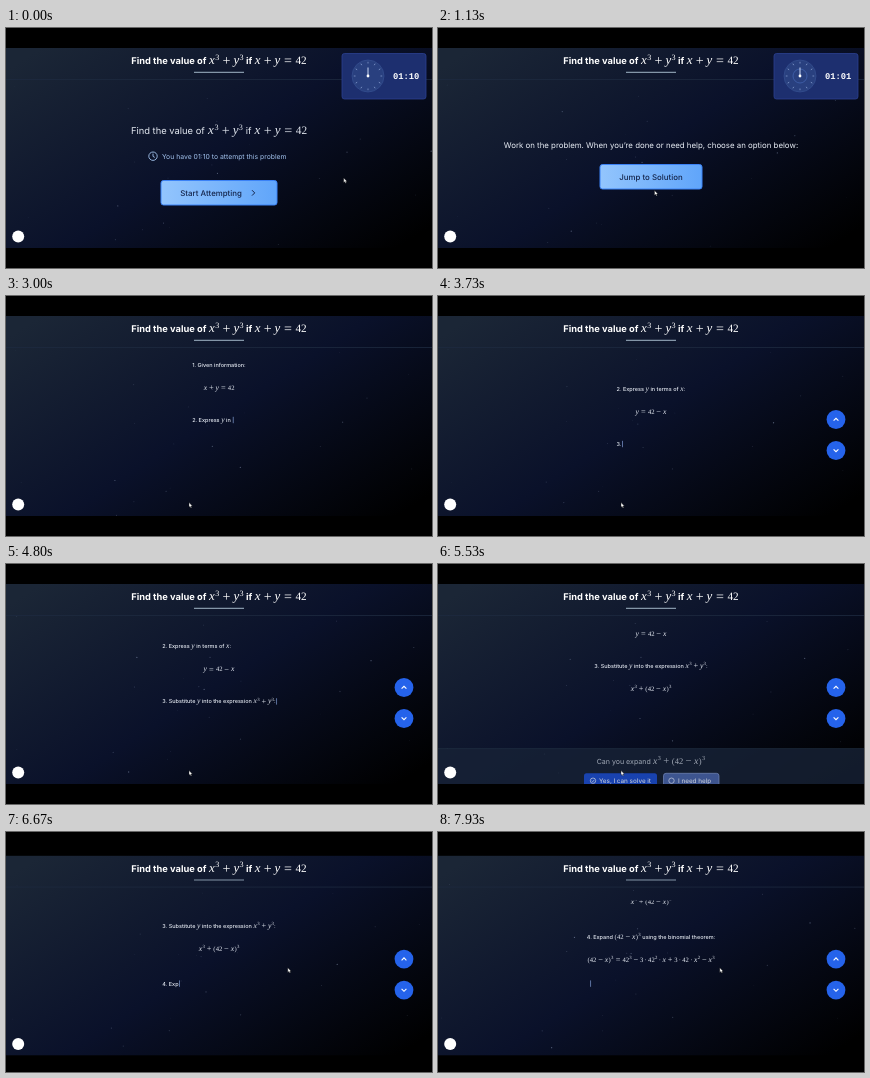
Recreate the animation shown at these times as an HTML page. Size 426x240 px, loop 8000 ms.

```html
<!DOCTYPE html>
<html lang="en">
<head>
<meta charset="utf-8">
<title>Solve for x and y</title>
<style>
  html, body { margin: 0; width: 100%; height: 100%; overflow: hidden; background: #000; }
  svg { display: block; width: 100vw; height: 100vh; }
  text { white-space: pre; text-rendering: geometricPrecision; font-family: Inter, sans-serif; }
  .m { font-family: "Liberation Serif", serif; text-anchor: middle; }
  .i { font-style: italic; }
  .mono { font: bold 8.8px "Liberation Mono", monospace; }
</style>
</head>
<body>
<svg viewBox="0 0 426 240">
  <defs>
    <linearGradient id="bg" gradientUnits="userSpaceOnUse" x1="115" y1="-32" x2="311" y2="272">
      <stop offset="0" stop-color="#1b2636"/><stop offset=".5" stop-color="#0a112a"/><stop offset="1" stop-color="#000"/>
    </linearGradient>
    <linearGradient id="btn"><stop offset="0" stop-color="#93c5fd"/><stop offset="1" stop-color="#60a5fa"/></linearGradient>
    <clipPath id="frame"><rect y="20" width="426" height="200"/></clipPath>
    <clipPath id="body"><rect y="65" width="426" height="155"/></clipPath>
  </defs>
  <rect width="426" height="240"/>
  <g id="scene">
    <g clip-path="url(#frame)">
      <rect y="20" width="426" height="200" fill="url(#bg)"/>
      <g id="stars" fill="#b6c6e6"></g>
      <path d="M0 51.5H426" stroke="#1e2a3f" stroke-width=".8"/>
      <g id="title" fill="#fff"></g>
      <path d="M188 44.4H238" stroke="#8496a8" stroke-width="1.1"/>

      <g id="timer">
        <rect x="336" y="25.5" width="84" height="45.5" rx="2.5" fill="#1d2f6f" stroke="#2b4191" stroke-width=".8"/>
        <circle cx="362" cy="48" r="16" fill="#29407f" stroke="#3a5596" stroke-width=".6"/>
        <g id="ticks" stroke="#8ea5d6" stroke-width=".7"></g>
        <circle id="ring" cx="362" cy="48" r="7" fill="none" stroke="#4667b5" stroke-width=".7"/>
        <path d="M362 48V39.5" stroke="#dbe7ff" stroke-width=".9"/>
        <circle cx="362" cy="48" r="1.4" fill="#fff"/>
        <text id="count" class="mono" x="387" y="51.3" fill="#fff"></text>
      </g>

      <g id="intro">
        <g id="question" fill="#e3e8f0"></g>
        <g fill="none" stroke="#a3c3ee" stroke-width=".9"><circle cx="147" cy="128.2" r="4.2"/><path d="M147 125.6V128.4L148.8 129.4"/></g>
        <g id="limit" fill="#a3c3ee"></g>
        <rect x="155" y="152.5" width="116" height="24.5" rx="2.5" fill="url(#btn)" stroke="#3b82f6"/>
        <g id="start" fill="#14244a"></g>
        <path d="M246 162.2L248.7 164.9L246 167.6" fill="none" stroke="#14244a"/>
      </g>

      <g id="work">
        <g id="hint" fill="#e8edf5"></g>
        <rect x="162" y="136.5" width="102" height="24.5" rx="2.5" fill="url(#btn)" stroke="#3b82f6"/>
        <g id="jump" fill="#14244a"></g>
      </g>

      <g clip-path="url(#body)"><g id="steps" fill="#e6ebf3"></g></g>

      <g id="nav" fill="none" stroke="#fff" stroke-width="1.1">
        <g fill="#2563eb" stroke="none"><circle cx="398" cy="123.5" r="9.4"/><circle cx="398" cy="154.5" r="9.4"/></g>
        <path d="M395.6 124.7L398 122.3L400.4 124.7M395.6 153.3L398 155.7L400.4 153.3"/>
      </g>

      <g id="panel">
        <rect width="426" height="60" fill="#172236"/>
        <path d="M0 .3H426" stroke="#263449" stroke-width=".6"/>
        <g id="ask" fill="#c3ccd8"></g>
        <rect x="146" y="25" width="73" height="15" rx="2.5" fill="#1d4fd0"/>
        <rect x="225.500" y="25" width="55.500" height="15" rx="2.5" fill="#4a66ab" stroke="#8ba4dc" stroke-width=".7"/>
        <g fill="none" stroke="#dbe6ff" stroke-width=".8"><circle cx="155" cy="32.400" r="2.700"/><path d="M153.800 32.400L154.800 33.400L156.300 31.500"/><circle cx="233.500" cy="32.400" r="2.700"/></g>
        <g id="answers" fill="#e4ecff"></g>
      </g>
      <circle cx="12.200" cy="208.400" r="6" fill="#fff"/>
    </g>
  </g>
  <path id="cursor" d="M0 0V4.600L1.100 3.700L1.900 5.300L2.700 4.900L2 3.400H3.400Z" fill="#fff" stroke="#111" stroke-width=".4"/>
</svg>
<script>
const $ = id => document.getElementById(id);
const LOOP = 8000, MID = 213, CUT = 5930, CHAR = 25;
const clamp = v => Math.max(0, Math.min(1, v));
const ramp = (t, a, b) => clamp((t - a) / (b - a));
const smooth = p => p * p * (3 - 2 * p);
const easeOut = p => 1 - (1 - p) ** 3;
const fade = (id, v) => {
  $(id).setAttribute('opacity', v);
  $(id).style.display = v > 0 ? '' : 'none';
};
const move = (id, x, y) => $(id).setAttribute('transform', `translate(${x} ${y})`);

// Text layout: plain runs in Inter, $...$ runs as small formulas.
const pen = document.createElement('canvas').getContext('2d');
function measure(s, size, weight) {
  pen.font = `${weight} 100px Inter, sans-serif`;
  return pen.measureText(s).width * size / 100;
}

const glyphWidth = { x: .572, y: .526, '(': .389, ')': .389, '+': .778, '−': .778, '=': .778, '·': .278 };
const gaps = { '+': .222, '−': .222, '·': .222, '=': .278 };

function formula(src, x, y, em) {
  let html = '', w = 0;
  for (let k = 0; k < src.length; k++) {
    const sup = src[k] === '^';
    const c = sup ? src[++k] : src[k];
    const cell = sup ? .4 : glyphWidth[c] || .5;
    const gap = gaps[c] || 0;
    const sign = '+−='.includes(c), letter = 'xy'.includes(c);
    const size = em * (sup ? .72 : sign ? 1.25 : letter ? 1.15 : 1);
    const dy = sup ? -.4 : sign ? .06 : 0;
    w += gap;
    html += `<text class="m${letter ? ' i' : ''}" x="${x + (w + cell / 2) * em}" y="${y + dy * em}" font-size="${size}">${c}</text>`;
    w += cell + gap;
  }
  return { html, w: w * em };
}

function layout(src, x, y, size, weight = 400, count = Infinity) {
  let html = '', w = 0;
  src.split('$').forEach((run, k) => {
    if (count <= 0 || !run) return;
    if (k % 2) {
      if (count >= run.length) {
        const f = formula(run, x + w, y, size * 1.21);
        html += f.html;
        w += f.w;
      }
    } else {
      const s = run.slice(0, count);
      html += `<text x="${x + w}" y="${y}" font-size="${size}" font-weight="${weight}">${s}</text>`;
      w += measure(s, size, weight);
    }
    count -= run.length;
  });
  return { html, w };
}

function centered(src, y, size, weight, mid = MID) {
  const { w } = layout(src, 0, y, size, weight);
  return layout(src, mid - w / 2, y, size, weight).html;
}

const problem = 'Find the value of $x^3+y^3$ if $x+y=42$';
function setText() {
  $('title').innerHTML = centered(problem, 36.3, 9.3, 700);
  $('question').innerHTML = centered(problem, 106.2, 9.4, 400);
  $('limit').innerHTML = layout('You have 01:10 to attempt this problem', 156, 130.7, 6.85).html;
  $('start').innerHTML = layout('Start Attempting', 174.3, 167.6, 7.86, 500).html;
  $('hint').innerHTML = centered('Work on the problem. When you’re done or need help, choose an option below:', 120.4, 7.86, 400);
  $('jump').innerHTML = centered('Jump to Solution', 151.5, 7.86, 500);
  $('ask').innerHTML = centered('Can you expand $x^3+(42−x)^3$', 15.3, 7.05, 400);
  $('answers').innerHTML = layout('Yes, I can solve it', 161, 34.7, 6.3, 500).html + layout('I need help', 240, 34.7, 6.3, 500).html;
}

// y is the line centre before scrolling, at is when typing begins.
const lines = [
  { y: 69, at: 1675, src: '1. Given information:' },
  { y: 92, at: 2330, src: '$x+y=42$', mid: true },
  { y: 124, at: 2600, src: '2. Express $y$ in terms of $x$:' },
  { y: 147, at: 3320, src: '$y=42−x$', mid: true },
  { y: 179, at: 3675, src: '3. Substitute $y$ into the expression $x^3+y^3$:' },
  { y: 202, at: 4880, src: '$x^3+(42−x)^3$', mid: true },
  { y: 225, at: 5050, src: '' },
  { y: 237, at: 6515, src: '4. Expand $(42−x)^3$ using the binomial theorem:' },
  { y: 260, at: 7690, src: '$(42−x)^3=42^3−3·42^2·x+3·42·x^2−x^3$', mid: true },
  { y: 283.5, at: 7860, src: '', indent: 3 }
];
const scrollFor = l => Math.max(0, l.y - 148);

function drawSteps(t) {
  const seen = lines.filter(l => t >= l.at);
  const typed = l => l.mid ? Infinity : Math.floor((t - l.at) / CHAR + .01);
  const widths = seen.map(l => layout(l.src, 0, 0, 5.5, 500, typed(l)).w);
  const left = MID - Math.max(0, ...widths) / 2;
  let html = '';
  seen.forEach((l, k) => {
    const x = l.mid ? MID - widths[k] / 2 : left + (l.indent || 0);
    html += layout(l.src, x, l.y + 2, 5.5, 500, typed(l)).html;
    const waiting = t > 5200 && t < 6515;
    if (k === seen.length - 1 && !waiting)
      html += `<rect x="${x + widths[k] + .6}" y="${l.y - 3.2}" width=".7" height="6.4" fill="#7f9bd2"/>`;
  });
  $('steps').innerHTML = html;
  const scroll = lines.reduce((s, l, k) =>
    k ? s + (scrollFor(l) - scrollFor(lines[k - 1])) * smooth(ramp(t, l.at - 150, l.at)) : s, 0);
  move('steps', 0, -scroll);
}

// Cursor stops: time, x, y.
const stops = [[0, 337.7, 150], [130, 337.7, 150], [420, 216.5, 162.6], [1180, 216.5, 162.6], [1330, 213, 150],
  [1480, 213, 150], [1740, 183, 206.6], [6240, 183, 206.6], [6520, 281.8, 135.8], [LOOP, 281.8, 135.8]];
function moveCursor(t) {
  const k = stops.findIndex(s => s[0] > t);
  const [a, b] = [stops[k - 1], stops[k]];
  const p = smooth(ramp(t, a[0], b[0]));
  move('cursor', a[1] + (b[1] - a[1]) * p, a[2] + (b[2] - a[2]) * p);
}

let seed = 11;
const rand = () => (seed = seed * 16807 % 2147483647) / 2147483647;
const stars = Array.from({ length: 26 }, () => {
  const el = document.createElementNS('http://www.w3.org/2000/svg', 'circle');
  el.setAttribute('r', .3 + rand() * .35);
  $('stars').append(el);
  return { el, x: rand() * 426, y: rand() * 165, vx: (rand() - .5) * 6, vy: (rand() - .5) * 6, ph: rand() * 6 };
});
$('ticks').innerHTML = Array.from({ length: 12 }, (_, k) =>
  `<path d="M362 33.800V35.500" transform="rotate(${k * 30} 362 48)"/>`).join('');

function draw(t) {
  const s = t / 1000;
  stars.forEach(p => {
    p.el.setAttribute('cx', p.x + p.vx * s);
    p.el.setAttribute('cy', 53 + p.y + p.vy * s);
    p.el.setAttribute('opacity', .27 + .15 * Math.sin(s * 2 + p.ph));
  });
  move('scene', 0, t < CUT ? 0 : 3.6);

  const left = 70 - Math.max(0, Math.floor((t - 480) / 70));
  $('count').textContent = `0${Math.floor(left / 60)}:${String(left % 60).padStart(2, '0')}`;
  fade('ring', ramp(t, 480, 560));
  fade('timer', 1 - ramp(t, 1400, 1490));
  fade('intro', 1 - ramp(t, 460, 550));
  fade('work', ramp(t, 550, 660) * (1 - ramp(t, 1400, 1490)));
  fade('nav', ramp(t, 3480, 3600));

  const open = easeOut(ramp(t, 5422, 5672)) * (1 - smooth(ramp(t, 6200, 6400)));
  fade('panel', open);
  move('panel', 0, 220 - 43.5 * open);
  drawSteps(t);
  moveCursor(t);
}

setText();
const began = performance.now();
(function tick() {
  draw((performance.now() - began) % LOOP);
  requestAnimationFrame(tick);
})();
</script>
</body>
</html>
```
